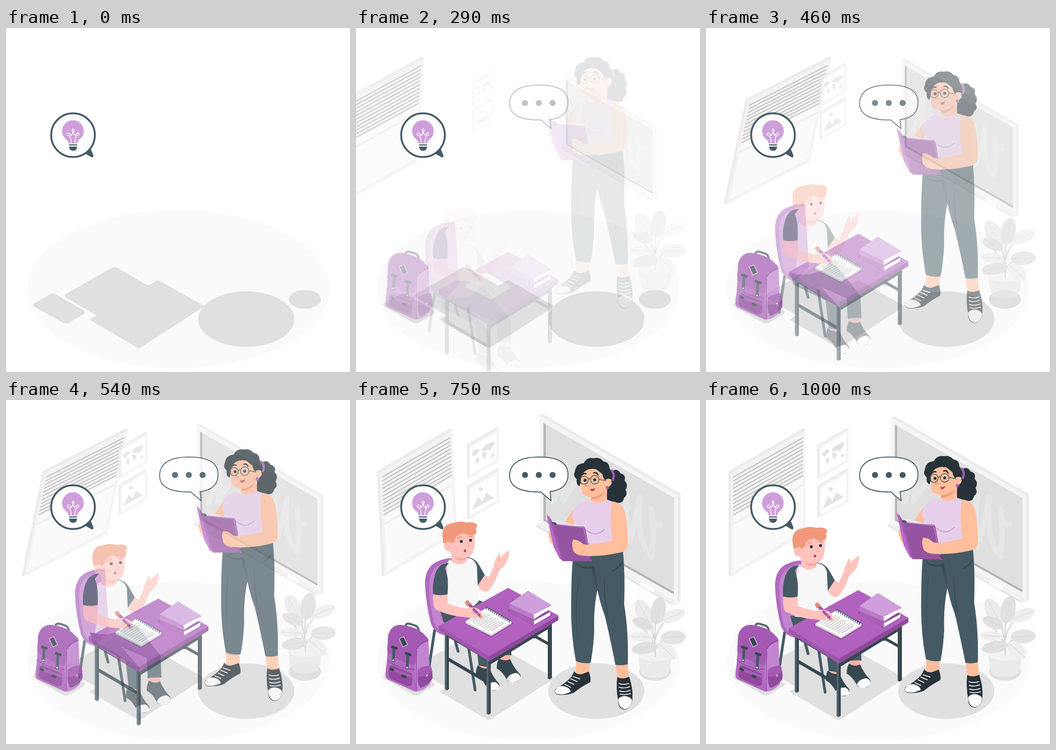
Write an HTML page that moves like this. It is 748 by 748 pixels and loops after 1040 ms.

```html
<!DOCTYPE html>
<html lang="en">
<head>
<meta charset="utf-8">
<title>Classroom</title>
<style>
html, body { margin: 0; width: 100%; height: 100%; overflow: hidden; background: #fff }
svg { display: block; width: 100vw; height: 100vh }
.line { fill: none; stroke-linecap: round; stroke-linejoin: round }
</style>
</head>
<body>
<svg viewBox="0 0 748 748">
  <ellipse cx="374.5" cy="568" rx="329" ry="172" fill="#fafafa"/>
  <g fill="#e0e0e0">
    <path d="M61 599L94 580Q101 576 108 579L169 614Q174 618 169 622L138 640Q130 645 122 640L62 606Q57 602 61 599Z"/>
    <path d="M128 582Q127 580 131 578L229 522Q236 518 243 522L309 560 331 548 432 605 289 697 181 634 197 625 130 586Q128 584 128 582Z"/>
    <ellipse cx="522.5" cy="633" rx="104.5" ry="60.5"/>
    <ellipse cx="650" cy="590" rx="35" ry="20.5"/>
  </g>

  <g id="window">
    <path d="M49 155L211 62 216 64 216 291 54 384 49 382Z" fill="#ebebeb"/>
    <path d="M54 158L216 66V291L54 384Z" fill="#f3f3f3"/>
    <path d="M60 163L211 77V284L60 372Z" fill="#fafafa"/>
    <path d="M60 270L211 184" stroke="#f0f0f0" stroke-width="5"/>
    <path d="M60 163L211 77V166L60 252Z" fill="#f2f2f2"/>
    <path id="slats" stroke="#c0c0c0" stroke-width="2.3"/>
  </g>

  <g id="pictures">
    <path d="M242 99L306 61 310 64V133L246 171 242 169ZM242 187L306 149 310 152V220L246 257 242 255Z" fill="#ebebeb"/>
    <path d="M246 101L310 64V133L246 171ZM246 189L310 152V220L246 257Z" fill="#f3f3f3"/>
    <path d="M249 105L305 72V131L249 163ZM249 193L305 160V218L249 249Z" fill="#fff"/>
    <g fill="#e4e4e4">
      <path d="M252 118L258 110 266 107 269 112 263 117 260 122 256 123ZM261 126L268 127 268 134 263 140 261 133ZM274 107L280 100 290 95 299 92 300 99 295 105 291 112 286 108 282 112 276 112ZM274 114L282 115 284 120 280 131 275 123ZM293 120L299 116 300 122 294 126Z"/>
      <path d="M253 237L266 209 275 219 283 201 300 211Z"/>
      <circle cx="271" cy="193" r="4.5"/>
    </g>
  </g>

  <g id="board">
    <path d="M403 38L409 35 702 205V434L692 440 403 274Z" fill="#ebebeb"/>
    <path d="M403 38L696 208V438L403 272Z" fill="#f5f5f5"/>
    <path d="M411 54L688 213V418L411 260Z" fill="#dfdfdf"/>
    <path d="M411 54L416 57V259L688 413V418L411 262Z" fill="#b5b5b5"/>
    <path class="line" d="M432 222Q455 160 458 138Q460 170 452 220Q470 190 478 184M590 208Q582 280 594 305Q612 240 616 210Q606 300 640 340Q648 270 640 238Q640 280 660 270" stroke="#e6e6e6" stroke-width="12"/>
    <path d="M396 271L402 266 690 431 696 436 686 440Z" fill="#f0f0f0"/>
    <path d="M396 271L686 438V441L396 274Z" fill="#e0e0e0"/>
    <path class="line" d="M620 397L642 409" stroke="#fff" stroke-width="8"/>
  </g>

  <g id="plant">
    <path d="M614 552L686 552Q684 588 676 596Q650 608 624 596Q616 584 614 552Z" fill="#ebebeb"/>
    <ellipse cx="650" cy="554" rx="35" ry="12" fill="#f3f3f3"/>
    <path class="line" d="M651 555Q647 500 656 440M651 520Q655 490 684 468M650 525Q642 480 622 448M650 530Q630 496 612 484M650 545Q660 515 692 513M650 545Q630 515 606 516" stroke="#d4d4d4" stroke-width="2.5"/>
    <g id="leaves"></g>
  </g>

  <g id="teacher">
    <path d="M556 151Q568 142 575 155Q588 158 584 171Q593 180 586 191Q592 202 583 208Q580 223 565 218Q550 222 541 211Q547 200 546 188Q557 183 556 151Z" fill="#263238"/>
    <g fill="#ffbf9d">
      <path d="M479 556H508L508 592Q492 598 478 588ZM563 564H591L593 604Q580 608 569 602Z"/>
      <path d="M512 188L545 178 546 214Q526 226 510 214Z"/>
      <path d="M492 216Q470 232 453 264L470 272Q484 250 488 230Z"/>
      <path d="M424 274Q415 290 421 298Q424 312 435 312L444 300 432 275Z"/>
    </g>
    <path d="M512 205Q530 203 542 192Q534 211 512 212Z" fill="#f09a7c"/>
    <g fill="#263238">
      <path d="M475 585Q478 592 490 592L506 586Q512 601 509 609Q488 620 474 632Q455 639 437 636Q429 631 434 624Q455 612 468 598Z"/>
      <path d="M568 598Q580 604 594 597Q603 625 601 645Q600 665 585 669Q570 668 570 650Q565 622 568 598Z"/>
    </g>
    <path d="M433 627Q440 616 453 618Q465 621 467 630Q452 638 438 635Q431 632 433 627ZM570 646Q577 637 589 640Q599 643 600 648Q599 665 585 668Q571 666 570 646Z" fill="#fff"/>
    <path class="line" d="M454 614L467 620M461 608L474 614M467 602L481 608M472 597L487 602M572 612Q582 616 593 612M572 620Q582 624 595 619M573 628Q583 632 596 627M574 635Q584 638 597 634" stroke="#fff" stroke-width="1.8"/>
    <path d="M473 322L578 305Q586 360 583 440Q593 500 591 570Q577 574 564 571Q552 510 541 465Q530 435 525 408Q516 450 518 500Q515 545 510 567Q494 570 478 563Q466 500 468 430Q468 370 473 322Z" fill="#455a64"/>
    <path d="M472 345Q488 363 517 357Q516 380 526 412Q518 385 512 361Q488 366 472 345ZM514 346Q522 370 527 418L520 380ZM541 372Q538 420 551 480Q535 430 541 372ZM487 372Q475 440 482 515Q472 440 487 372ZM579 352Q568 366 555 368Q570 360 579 346Z" fill="#37474f"/>
    <path d="M498 214Q525 226 545 212L557 216Q551 255 558 306Q530 315 508 312L490 270Q472 264 470 248Q473 222 498 214Z" fill="#e7cfec"/>
    <path class="line" d="M502 279Q520 295 540 277" stroke="#c99ad3" stroke-width="2"/>
    <path d="M427 262L496 271 499 276 512 346 449 346Z" fill="#95549f"/>
    <path d="M414 243L427 262 450 345 443 341 430 316Z" fill="#ba68c8"/>
    <path d="M418 246L429 263 450 345 445 337Z" fill="#a05aad"/>
    <path d="M426 259Q445 256 466 266L495 271 431 266Z" fill="#f0e1f3"/>
    <path class="line" d="M428 265L495 273 511 346" stroke="#b883c4" stroke-width="1.8"/>
    <ellipse cx="431" cy="264" rx="5.5" ry="3" fill="#455a64" transform="rotate(15 431 264)"/>
    <path d="M556 216Q579 218 585 240Q592 275 591 312Q588 326 570 328Q530 337 492 334Q476 332 472 322Q468 308 472 299Q484 299 494 309Q508 312 524 308L558 301Q550 255 556 216Z" fill="#ffbf9d"/>
    <path class="line" d="M509 338L514 347" stroke="#793f85" stroke-width="3"/>
    <path d="M489 150Q486 183 492 199Q505 211 526 204Q540 197 550 183L552 158Q540 138 518 142Q500 144 489 150Z" fill="#ffbf9d"/>
    <path d="M486 183Q478 180 480 168Q471 160 476 151Q478 134 495 133Q502 119 517 122Q530 119 538 129Q551 131 551 144Q560 156 557 170Q548 163 543 171Q537 166 536 157Q528 150 522 146Q505 143 496 152Q488 160 489 174Z" fill="#263238"/>
    <path class="line" d="M556 149Q563 156 559 169" stroke="#a15bb0" stroke-width="5"/>
    <circle cx="548" cy="175" r="8" fill="#ffbf9d"/>
    <circle cx="546.5" cy="186" r="3.6" fill="#ab5fbb"/>
    <path class="line" d="M503 172L499 182 506 182" stroke="#f09a7c" stroke-width="2.5"/>
    <g fill="#263238"><circle cx="498" cy="170" r="3.2"/><circle cx="519" cy="169" r="3.2"/></g>
    <path class="line" d="M491 159Q495 154 500 156M517 154Q523 152 526 158" stroke="#263238" stroke-width="3"/>
    <g fill="none" stroke="#455a64" stroke-width="1.6"><circle cx="496" cy="170" r="8.8"/><circle cx="519" cy="169" r="9.3"/><path d="M505 168Q507 165 510 168M528 168L544 171"/></g>
    <path d="M509 189Q516 190 520 186Q519 194 512 194Z" fill="#b0474a"/>
  </g>

  <g id="chair">
    <path class="line" d="M171 506L159 585M244 538L259 636M216 530L222 552" stroke="#455a64" stroke-width="6"/>
    <path d="M150 405Q150 372 172 359Q195 347 215 350L224 485 194 517Q172 514 163 492Q152 450 150 405Z" fill="#b06abf"/>
    <path d="M159 408Q160 377 180 365Q198 354 215 355L224 485 194 514Q176 506 169 488Q160 450 159 408Z" fill="#c284cf"/>
  </g>

  <g id="boy">
    <path d="M183 470Q225 474 265 447L285 455 336 520 338 567Q324 574 308 569L306 525 250 500 290 545 291 594Q278 600 267 592L260 530 190 495Z" fill="#455a64"/>
    <path d="M268 590L290 594 290 602 266 602ZM312 568L335 567 337 580 311 582Z" fill="#ffb2a8"/>
    <g fill="#37474f">
      <path d="M311 574Q323 582 335 576Q343 595 357 609Q360 620 349 626Q337 630 329 622Q318 602 306 596Q306 582 311 574Z"/>
      <path d="M265 589Q278 601 290 594Q297 615 311 629Q315 640 301 645Q286 645 281 632Q273 617 261 611Q260 598 265 589Z"/>
    </g>
    <path d="M328 620Q332 608 348 606Q359 609 357 619Q347 630 336 627ZM282 634Q288 626 303 626Q314 632 311 641Q300 647 287 642Z" fill="#fff"/>
    <path d="M264 414L280 393 289 398 299 376Q302 360 310 347Q314 344 314 350L313 356Q325 344 332 339Q335 346 328 364Q322 376 312 381Q302 414 287 428Q272 433 264 414Z" fill="#ffc3bd"/>
    <path class="line" d="M313 356L310 366M312 381Q307 383 304 380" stroke="#f5a59c" stroke-width="1.2"/>
    <path d="M238 354Q258 354 268 372L280 393 264 417Q266 380 248 361Z" fill="#455a64"/>
    <path d="M204 359Q222 375 242 356Q257 356 263 374Q264 410 267 450Q244 478 193 472Q200 440 200 400Q192 370 204 359Z" fill="#f7f7f7"/>
    <path d="M207 340L240 350 240 364Q222 376 207 363Z" fill="#ffc3bd"/>
    <path d="M240 355Q225 360 214 352Q222 366 240 360Z" fill="#f5a59c"/>
    <path d="M205 320Q214 303 230 302L257 300Q261 325 254 345Q246 358 228 356Q210 353 203 342Z" fill="#ffc3bd"/>
    <path d="M190 323Q186 302 190 294Q196 281 208 281Q225 274 240 279Q258 276 263 284Q265 289 260 291Q265 301 257 306Q246 309 235 302Q222 303 217 312Q216 320 209 325L203 333Z" fill="#f0997a"/>
    <circle cx="201" cy="331" r="10" fill="#ffc3bd"/>
    <path class="line" d="M197 328Q203 328 205 334" stroke="#f5a59c" stroke-width="1.4"/>
    <g fill="#263238"><circle cx="229" cy="320" r="3.2"/><circle cx="249" cy="317.5" r="3.2"/></g>
    <path class="line" d="M221 315Q225 309 230 311M245 309Q250 307 253 311" stroke="#f0997a" stroke-width="2.5"/>
    <path class="line" d="M241 320L246 330 240 331" stroke="#f5a59c" stroke-width="1.6"/>
    <ellipse cx="237" cy="340.5" rx="2.6" ry="3" fill="#b0474a"/>
  </g>

  <g id="desk">
    <g fill="#37474f">
      <path d="M193 510H202V634L198 637 193 634ZM417 492H426V610L421 613 417 611ZM202 566L286 615V623L202 574ZM386 514L418 532V539L386 521ZM386 514L392 511 392 522 386 525Z"/>
      <path d="M293 570L417 496V504L293 580ZM202 514L286 563V572L202 522Z"/>
      <path d="M284 568H293V687L288 690 284 687Z"/>
    </g>
    <path d="M197 512V637L193 634V510ZM288 568V690L284 687V568Z" fill="#52666f"/>
    <path d="M180 496L289 560 440 474V484L289 574 180 506Z" fill="#9c56aa"/>
    <path d="M289 562L440 474V484L289 574Z" fill="#8d4a9b"/>
    <path d="M180 497L331 414 440 474 289 563Z" fill="#b062be"/>
    <path d="M330 465L386 496 427 474 420 465 340 448ZM234 489L293 522 342 492 330 480Z" fill="#8e4b9c"/>
    <path d="M334 458L386 485 425 465 424 474 387 496 334 467Z" fill="#a860b5"/>
    <path d="M387 486L423 466 422 474 387 494Z" fill="#fff"/>
    <path d="M334 449L374 421 424 451V454L388 484 334 459Z" fill="#b97bc6"/>
    <path d="M386 472L423 453 421 461 387 481Z" fill="#fff"/>
    <path d="M334 448L374 420 424 451 386 472Z" fill="#ce9fdb"/>
    <path d="M238 487V491L294 519 338 492V488Z" fill="#d8d8d8"/>
    <path d="M238 487L284 457 338 488 294 515Z" fill="#fff"/>
    <path id="notes" class="line" stroke="#b4b4b4" stroke-width="1.3"/>
    <path id="spiral" class="line" stroke="#455a64" stroke-width="2"/>
    <path class="line" d="M295 507L321 491" stroke="#c58bd0" stroke-width="1.3"/>
    <path class="line" d="M243 447L272 477" stroke="#a058ae" stroke-width="7"/>
    <path d="M237 447Q238 440 244 441L249 448 242 454Z" fill="#dc8c78"/>
    <path d="M269 479L275 474 278 482Z" fill="#ffc3a0"/>
    <path d="M168 425Q166 450 172 460Q200 475 240 478Q258 482 273 475Q277 467 268 461Q255 453 238 459Q216 455 199 448V425Z" fill="#ffc3bd"/>
    <path class="line" d="M256 461L268 473" stroke="#a058ae" stroke-width="6"/>
    <path class="line" d="M251 468Q260 472 267 469" stroke="#f5a59c" stroke-width="1.3"/>
    <path d="M202 360Q180 359 172 385Q165 408 168 428Q184 432 199 428Q202 392 193 371Z" fill="#455a64"/>
  </g>

  <g id="bag">
    <path class="line" d="M107 499V493Q108 484 118 487L130 491Q137 494 137 508" stroke="#56686f" stroke-width="4.5"/>
    <path d="M70 512Q76 489 98 489Q134 493 150 512Q158 518 158 534L161 617Q146 633 128 634L68 607Q62 602 65 585Q69 560 68 540Z" fill="#b06abf"/>
    <path d="M129 530Q140 510 152 515Q158 520 158 534L161 617Q148 632 133 634Q124 600 129 530Z" fill="#c284cf"/>
    <path d="M70 512Q76 489 98 489Q134 493 150 512Q158 518 158 524Q140 530 132 541Q131 562 128 577Q96 572 68 546Z" fill="#a45ab3"/>
    <path d="M72 581Q77 574 86 580L119 594Q124 597 121 620Q116 624 108 621L74 605Q69 602 72 581Z" fill="#93499f"/>
    <path d="M74 581L121 598V604L73 588Z" fill="#a65fb4"/>
    <path d="M134 588Q140 580 162 577Q168 592 166 607Q155 622 140 626Q133 620 134 588Z" fill="#8f4a9e"/>
    <path d="M134 588Q140 580 162 577L166 590Q150 604 134 601Z" fill="#a45ab3"/>
    <path class="line" d="M132 542Q142 525 157 523M132 545Q130 610 132 632M67 565Q90 584 128 586" stroke="#8a4598" stroke-width="1.3"/>
    <path class="line" d="M83 539L81 567M113 553L111 583" stroke="#455a64" stroke-width="6"/>
    <path class="line" d="M79 537L88 540M109 551L118 554M76 585L80 587M102 600L107 602" stroke="#37474f" stroke-width="6"/>
    <g fill="#e0e0e0"><circle cx="81" cy="566" r="2"/><circle cx="111" cy="582" r="2"/><circle cx="154" cy="599" r="2"/></g>
    <path d="M94 519L104 515 112 532 102 537Z" fill="#37474f" stroke="#e7cfec" stroke-width="1.3"/>
  </g>

  <g id="speech">
    <path d="M402 200Q334 201 334 164Q335 124 398 124Q461 124 461 162Q461 195 422 199L424 219Z" fill="#fff" stroke="#455a64" stroke-width="2" stroke-linejoin="round"/>
    <g fill="#455a64"><circle cx="367.5" cy="163" r="6.6"/><circle cx="397.5" cy="163" r="6.6"/><circle cx="427.5" cy="163" r="6.6"/></g>
  </g>

  <g fill="#455a64">
    <circle cx="145.7" cy="233" r="47.5" fill="#fff" stroke="#455a64" stroke-width="4"/>
    <path d="M172 273L184 262 190 277Q191 282 186 281Z"/>
    <path d="M136 251Q136 246 130 241Q122 235 122 224A23.5 23.5 0 0 1 169 224Q169 235 161 241Q155 246 155 251Z" fill="#ce9fdb"/>
    <path class="line" d="M142 250Q141 238 138 235Q131 233 134 229Q138 226 141 234Q145 231 146 227Q142 222 146 219.5Q150 222 146 227Q147 231 151 234Q154 226 158 229Q160 233 153 235Q150 240 150 250" stroke="#fff" stroke-width="1.7"/>
    <path d="M137 253H154.500V255.600H137ZM137 258H154.500Q154 267 146 267Q138 267 137 258Z"/>
  </g>
</svg>
<script>
const $ = id => document.getElementById(id);
const repeat = (n, f) => Array.from({ length: n }, (_, i) => f(i)).join('');

$('slats').setAttribute('d', repeat(11, i => `M59 ${168 + i * 8.2}L211 ${82 + i * 8.2}`));
$('spiral').setAttribute('d', repeat(12, i => `M${284 + i * 4.5} ${460 + i * 2.6}q-2 -5 2 -4`));
$('notes').setAttribute('d', repeat(9, i => `M${249 + i * 4.8} ${486 + i * 2.6}l${26 + i % 3 * 3} ${-16 - i % 3 * 1.8}`));

// Each leaf: centre, radii, tilt, colour
$('leaves').innerHTML = [
  [688, 468, 29, 13, -22, '#efefef'], [626, 460, 17, 31, -28, '#ebebeb'],
  [657, 456, 16, 30, 12, '#e0e0e0'], [624, 484, 24, 12, 22, '#e0e0e0'],
  [622, 513, 25, 10, 3, '#efefef'], [690, 514, 27, 15, -3, '#e3e3e3'],
  [628, 537, 29, 13, -10, '#e0e0e0'], [676, 544, 24, 15, 42, '#efefef']
].map(([x, y, rx, ry, a, c]) => {
  const vein = rx > ry ? `M${-rx} 0H${rx}` : `M0 ${-ry}V${ry}`;
  return `<g transform="translate(${x} ${y}) rotate(${a})"><ellipse rx="${rx}" ry="${ry}" fill="${c}"/><path d="${vein}" stroke="#d6d6d6"/></g>`;
}).join('');

// Cubic Bezier easing (.36, -.01, .5, 1.38) with overshoot
function ease(x) {
  const curve = (u, a, b) => 3 * (1 - u) ** 2 * u * a + 3 * (1 - u) * u * u * b + u ** 3;
  let lo = 0, hi = 1;
  for (let i = 0; i < 24; i++) {
    const mid = (lo + hi) / 2;
    if (curve(mid, .36, .5) < x) lo = mid; else hi = mid;
  }
  return curve(hi, -.01, 1.38);
}

function pose(id, opacity, transform = '') {
  $(id).setAttribute('opacity', Math.min(1, opacity));
  $(id).setAttribute('transform', transform);
}
const shift = y => `translate(0 ${y})`;
const zoom = (x, y, s) => `translate(${x} ${y}) scale(${s}) translate(${-x} ${-y})`;

function poseWindow(x, shown) {
  let dx = 0, skew, opacity = 1;
  if (x < .6) {
    opacity = ease(x / .6);
    dx = -374 * (1 - opacity);
    skew = 20 - 30 * opacity;
  } else if (x < .8) skew = -10 + 12 * ease((x - .6) / .2);
  else skew = 2 - 2 * ease((x - .8) / .2);
  pose('window', opacity * shown, `translate(${132 + dx} 223) skewX(${skew}) translate(-132 -223)`);
}

function draw(now) {
  const t = now % 1040;
  const x = Math.min(1, .036 + .958 * t / 1000);
  const e = ease(x), left = 1 - e;
  const shown = t < 130 ? 0 : 1;
  const fade = power => e ** power * shown;
  poseWindow(x, shown);
  pose('pictures', fade(1), zoom(275.5, 160, .5 + e / 2));
  pose('board', fade(1), zoom(553, 238, .5 + e / 2));
  pose('plant', fade(1), shift(-45 * left));
  pose('teacher', fade(2), shift(-90 * left));
  pose('chair', fade(2), shift(112 * left));
  pose('boy', fade(3), shift(112 * left + 45 * (1 - e ** 3)));
  pose('desk', fade(2), shift(112 * left));
  pose('bag', fade(1));
  pose('speech', fade(1));
  requestAnimationFrame(draw);
}
draw(performance.now());
</script>
</body>
</html>
```
